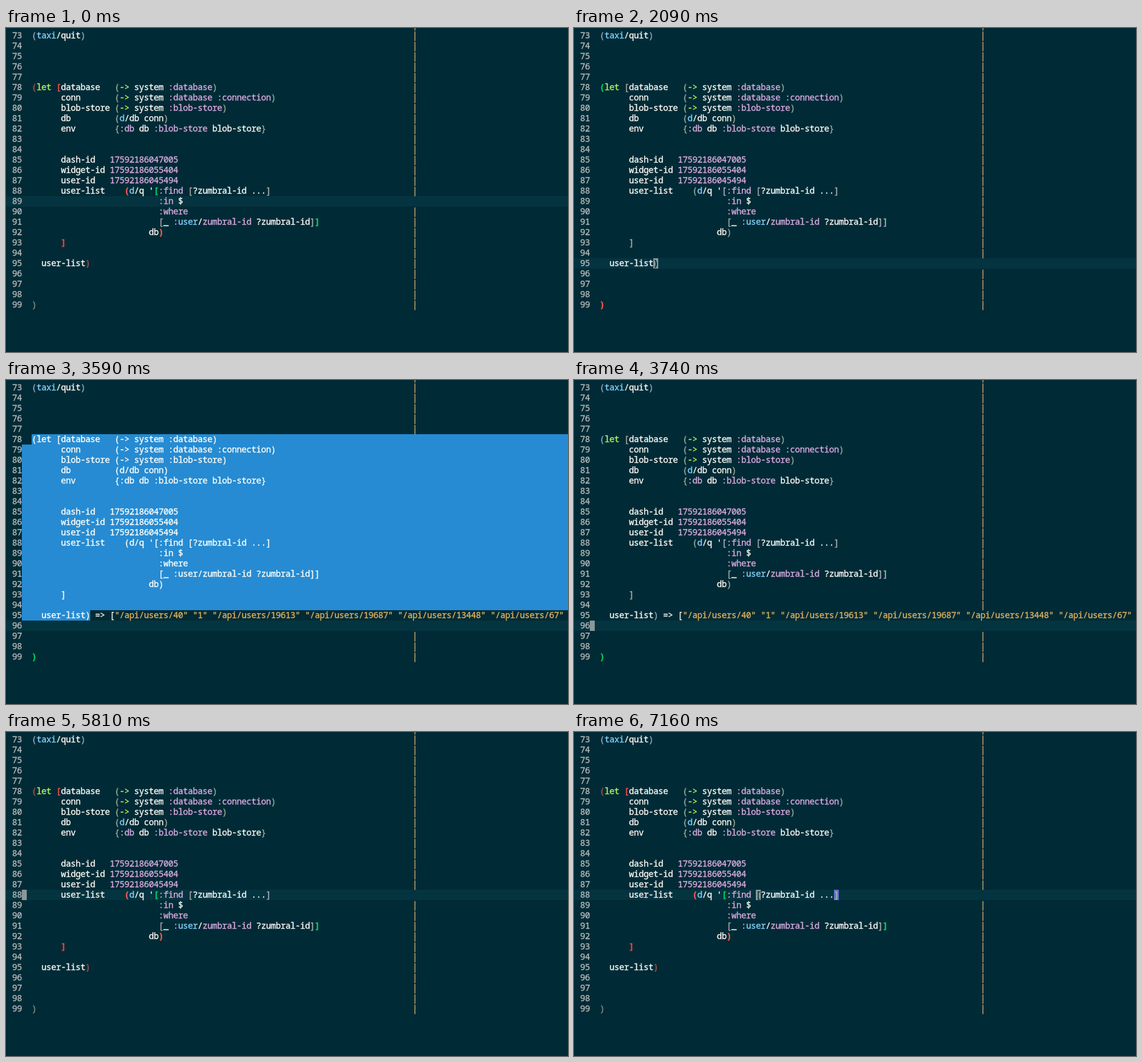
Recreate the animation shown at these times as an HTML page. Size 921 by 532 pixels, loop 8 s.

```html
<!DOCTYPE html>
<html lang="en">
<head>
<meta charset="utf-8">
<title>Editor session</title>
<style>
  html, body { margin: 0; width: 100%; height: 100%; overflow: hidden; background: #002b36; }
  svg { display: block; }
  text {
    font: 500 14px "Noto Sans Mono", "DejaVu Sans Mono", monospace;
    letter-spacing: -.4px; white-space: pre;
    fill: currentColor; stroke: currentColor; stroke-width: .35px;
  }
  .selected { color: #fdfdf8 !important; font-weight: 500 !important; }
</style>
</head>
<body>
<svg id="stage" width="921" height="532" viewBox="0 0 921 532"></svg>
<script>
const LOOP = 8000, FIRST = 73, LAST = 99, RULER_COL = 80;
const CELL = 8, LINE = 17, LEFT = 26, TOP = 4, WIDTH = 921;

const COLOR = {
  bg: '#002b36', line: '#043440', gutter: '#b4b8b8', plain: '#f8f8f2',
  key: '#d9aae0', form: '#b4f55f', ns: '#82cffb', string: '#deb05e',
  ruler: '#d0a970', cursor: '#8a9798', match: '#5f73c8', region: '#268bd2'
};
const DEPTH = ['#8c8c8c', '#93a8c6', '#b0b1a3', '#97b098', '#aebed8', '#b0b0b3'];
const ENCLOSING = ['#00d25f', '#ff5a52', '#dc4a4a', '#8b4a46'];

const CODE = {
  73: '  (taxi/quit)',
  78: '  (let [database   (-> system :database)',
  79: '        conn       (-> system :database :connection)',
  80: '        blob-store (-> system :blob-store)',
  81: '        db         (d/db conn)',
  82: '        env        {:db db :blob-store blob-store}',
  85: '        dash-id   17592186047005',
  86: '        widget-id 17592186055404',
  87: '        user-id   17592186045494',
  88: "        user-list    (d/q '[:find [?zumbral-id ...]",
  89: ' '.repeat(28) + ':in $',
  90: ' '.repeat(28) + ':where',
  91: ' '.repeat(28) + '[_ :user/zumbral-id ?zumbral-id]]',
  92: ' '.repeat(26) + 'db)',
  93: '        ]',
  95: '    user-list)',
  99: '  )'
};
const RESULT = ' => ["/api/users/40" "1" "/api/users/19613" "/api/users/19687" "/api/users/13448" "/api/users/67"';
const TOKEN = /"[^"]*"|[()[\]{}]|:(?=\w+\/)|\w+(?=\/)|\/|:?[^\s()[\]{}"\/]+/g;

// Each step overrides part of the previous state; "focus" trails the cursor.
const STEPS = [
  [0, { row: 89, col: 21, on: false, focus: [89, 21], match: null, region: false, result: false }],
  [600, { on: true }],
  [1050, { row: 90 }],
  [1350, { row: 91 }],
  [1500, { row: 92 }],
  [1650, { row: 93, col: 8 }],
  [1800, { row: 94, col: 0 }],
  [2090, { row: 95, col: 13, focus: [94, 0] }],
  [2390, { row: 96, col: 0 }],
  [2540, { focus: [96, 0] }],
  [3140, { on: false }],
  [3590, { region: true, result: true }],
  [3740, { region: false, on: true }],
  [4180, { on: false }],
  [4330, { row: 95, on: true, result: false }],
  [4480, { row: 94 }],
  [4620, { row: 93 }],
  [4770, { row: 92 }],
  [5070, { row: 91, focus: [92, 0] }],
  [5220, { focus: [91, 0] }],
  [5360, { row: 90 }],
  [5510, { row: 89 }],
  [5810, { row: 88 }],
  [6110, { col: 50 }],
  [6260, { focus: [88, 50], match: [88, 34] }],
  [6710, { on: false }],
  [6860, { on: true, col: 34, match: null }],
  [7010, { focus: [88, 34] }],
  [7160, { match: [88, 50] }]
];
let last = {};
const states = STEPS.map(([time, change]) => (last = { ...last, ...change, time }));

const svg = document.getElementById('stage');
const xOf = col => LEFT + col * CELL;
const yOf = row => TOP + (row - FIRST) * LINE;
const show = (el, visible) => el.setAttribute('visibility', visible ? 'visible' : 'hidden');

function add(tag, attrs, parent = svg) {
  const el = document.createElementNS('http://www.w3.org/2000/svg', tag);
  for (const name in attrs) el.setAttribute(name, attrs[name]);
  return parent.appendChild(el);
}
const block = (fill, row = FIRST, col = 0, width = CELL, rows = 1, parent = svg) =>
  add('rect', { x: xOf(col), y: yOf(row), width, height: rows * LINE, fill }, parent);

function write(string, row, col, color, parent) {
  const el = add('text', { x: xOf(col), y: yOf(row) + 13, color }, parent);
  el.textContent = string;
  return el;
}
function place(el, row, col) {
  el.setAttribute('x', xOf(col));
  el.setAttribute('y', yOf(row));
}
function tokenColor(token, before, next) {
  if (token[0] === '"') return COLOR.string;
  if (token[0] === ':' || /^\d+$/.test(token) || /:\w+\/$/.test(before)) return COLOR.key;
  if (token === 'let' || token === '->') return COLOR.form;
  return next === '/' ? COLOR.ns : COLOR.plain;
}
function eachToken(line, visit) {
  for (const { 0: token, index } of line.matchAll(TOKEN)) {
    visit(token, index, tokenColor(token, line.slice(0, index), line[index + token.length]));
  }
}

const currentLine = block(COLOR.line);
currentLine.setAttribute('width', WIDTH);
const region = add('g');
block(COLOR.region, 78, 2, WIDTH - xOf(2), 1, region);
block(COLOR.region, 79, 0, WIDTH - LEFT, 16, region);
block(COLOR.region, 95, 0, 14 * CELL, 1, region);
const matchBox = block(COLOR.match);
const cursor = block(COLOR.cursor);

const rulers = [];
for (let row = FIRST - 1; row <= LAST; row++) {
  rulers.push({ row, el: write('|', row, RULER_COL, COLOR.ruler) });
  if (row >= FIRST) write(row, row, -2, COLOR.gutter);
}

// The outermost form opens above the visible part of the buffer.
const pairs = [{ depth: 0, start: 0 }];
const open = [pairs[0]];
const brackets = [], regionText = [];
const position = (row, col) => row * 1000 + col;

for (const [key, line] of Object.entries(CODE)) {
  const row = +key;
  eachToken(line, (token, col, color) => {
    const el = write(token, row, col, color);
    if (row >= 78 && row <= 95) regionText.push(el);
    if (!'()[]{}'.includes(token)) return;
    let pair;
    if ('([{'.includes(token)) {
      pair = { depth: open.length, start: position(row, col) };
      pairs.push(pair);
      open.push(pair);
    } else {
      pair = open.pop();
      pair.end = position(row, col);
    }
    brackets.push({ el, row, col, pair });
  });
}
const result = add('g');
eachToken(RESULT, (token, col, color) => write(token, 95, 14 + col, color, result));

function render(state) {
  const { row, col, on, focus, match } = state;
  place(currentLine, row, -LEFT / CELL);
  place(cursor, row, col);
  show(cursor, on);
  show(matchBox, match);
  if (match) place(matchBox, ...match);
  show(region, state.region);
  show(result, state.result);
  for (const el of regionText) el.classList.toggle('selected', state.region);

  for (const ruler of rulers) {
    const covered = ruler.row === row ||
      (state.region && ruler.row >= 78 && ruler.row <= 95) ||
      (state.result && ruler.row === 95);
    show(ruler.el, !covered);
  }

  const at = position(...focus);
  const around = pairs.filter(p => p.start < at && at <= p.end).sort((a, b) => b.start - a.start);
  for (const b of brackets) {
    const lit = ENCLOSING[around.indexOf(b.pair)];
    const underCursor = on && b.row === row && b.col === col;
    b.el.setAttribute('color', underCursor ? COLOR.bg : lit || DEPTH[b.pair.depth]);
    b.el.style.fontWeight = lit ? 700 : 500;
  }
}

let shown;
function tick() {
  const time = performance.now() % LOOP;
  const state = states.findLast(s => s.time <= time);
  if (state !== shown) render(shown = state);
  requestAnimationFrame(tick);
}
tick();
</script>
</body>
</html>
```
